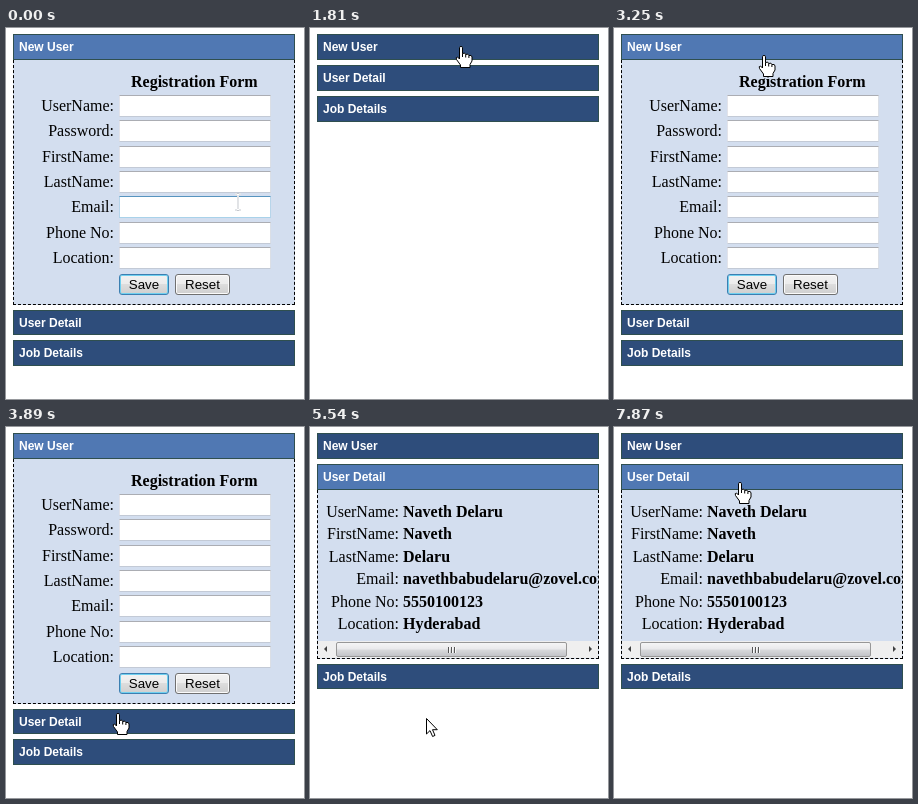
An HTML page for the animation above (8000 ms loop, 298 px wide and 371 px high).

```html
<!DOCTYPE html>
<html lang="en">
<head>
<meta charset="utf-8">
<title>Accordion form</title>
<style>
html, body { margin: 0; width: 100%; height: 100%; overflow: hidden; background: #fff; }
* { box-sizing: border-box; }
#accordion { position: absolute; left: 7px; top: 6.2px; width: 282px; }
.header {
  height: 25.8px; padding: 5px; border: 1px solid #2f4f4f; background: #2e4d7b; color: #fff;
  font: bold 12px/14px "Liberation Sans", Arial, sans-serif;
}
.header.selected { background: #5078b3; }
.pane + .pane { margin-top: 5px; }
.clip { overflow: hidden; }
.content {
  position: relative; overflow: hidden; background: #d3deef; color: #000;
  border: 1px dashed #000; border-top: 0;
  font: 16px/18px "Liberation Serif", "Times New Roman", serif;
}
.content > * { position: absolute; white-space: nowrap; }
.field {
  left: 105px; width: 152px; height: 22px; background: #fff;
  border: 1px solid; border-color: #abadb3 #dbdfe6 #c3cad6 #e2e3ea;
}
.field.hover { border-color: #5794bf #b7d5ea #a9d2ea #b7d5ea; }
.button {
  top: 214px; height: 21px; border: 1px solid #707070; border-radius: 3px;
  background: linear-gradient(#f2f2f2, #ebebeb 50%, #dddddd 50%, #cfcfcf);
  box-shadow: inset 0 0 0 1px #fbfbfb; text-align: center;
  font: 13.33px/19px "Liberation Sans", Arial, sans-serif;
}
.button.default { border-color: #3c7fb1; box-shadow: inset 0 0 0 1px #6fd0f0; }
.scrollbar { left: 0; top: 151px; width: 280px; height: 17px; background: #efefef; }
.scrollbar * { position: absolute; }
.thumb {
  left: 18px; top: 1px; width: 231px; height: 15px; border: 1px solid #979797; border-radius: 2px;
  background: linear-gradient(#f5f5f5, #e9e9eb 48%, #d9dadc 52%, #c3c4c8);
}
.grip {
  left: 111px; top: 4px; width: 8px; height: 6px;
  background: repeating-linear-gradient(90deg, #555 0 1px, #fafafa 1px 2px, transparent 2px 3px);
}
.arrow { top: 5px; border: 3.5px solid transparent; }
.arrow.left { left: 6px; border-right-color: #404040; border-left: 0; }
.arrow.right { right: 6px; border-left-color: #404040; border-right: 0; }
svg { position: absolute; left: 0; top: 0; overflow: visible; }
</style>
</head>
<body>
<div id="accordion"></div>
<svg id="cursor" width="24" height="24">
  <g id="hand" fill="#fff" stroke="#000" stroke-linejoin="round">
    <path d="M-1.5 13V1.5Q-1.5.5 0 .5T1.5 1.5V7.5Q4.5 6.3 4.7 8.5Q7.5 7.3 7.9 9.5Q11 8.8 11 11V15L9 18.5V21.5H-.5V19L-4.5 13.5Q-5.5 11-3.5 11Z"/>
    <path d="M1.5 7.5V11M4.7 8.5V11.5M7.9 9.5V12" fill="none"/>
  </g>
  <path id="pointer" d="M.5.5V16L4 12.6L6.6 18.5L9 17.4L6.5 11.7H11.3Z" fill="#fff" stroke="#000"/>
  <g id="beam" fill="none">
    <path d="M-3-8H-1L0-7L1-8H3M0-7V7M-3 8H-1L0 7L1 8H3" stroke="#c4c8ce" stroke-width="2"/>
    <path d="M-3-8H-1L0-7L1-8H3M0-7V7M-3 8H-1L0 7L1 8H3" stroke="#fff"/>
  </g>
</svg>
<script>
const LOOP = 8000;
const FORM_HEIGHT = 244.6, DETAIL_HEIGHT = 168.8;
const byId = id => document.getElementById(id);
const root = byId("accordion"), pointerLayer = byId("cursor");
const shapes = ["hand", "pointer", "beam"].map(byId);

function add(parent, className, text = "", style = {}) {
  const node = document.createElement("div");
  node.className = className;
  node.textContent = text;
  Object.assign(node.style, style);
  return parent.appendChild(node);
}

function addPane(title, height) {
  const pane = add(root, "pane");
  const header = add(pane, "header", title);
  const clip = add(pane, "clip");
  const content = add(clip, "content", "", { height: height + "px" });
  return { header, clip, content, height };
}

const form = addPane("New User", FORM_HEIGHT);
const detail = addPane("User Detail", DETAIL_HEIGHT);
addPane("Job Details", 0).clip.style.display = "none";

const addLabel = (pane, text, right, top) =>
  add(pane.content, "label", text + ":", { right: 280 - right + "px", top: top + "px" });

add(form.content, "title", "Registration Form", { left: "117px", top: "13px", fontWeight: "bold" });
const fields = ["UserName", "Password", "FirstName", "LastName", "Email", "Phone No", "Location"].map((name, i) => {
  const top = Math.round(35 + i * 25.35);
  addLabel(form, name, 100, top + 2);
  return { top: top + 32, node: add(form.content, "field", "", { top: top + "px" }) };
});
add(form.content, "button default", "Save", { left: "105px", width: "50px" });
add(form.content, "button", "Reset", { left: "161px", width: "55px" });

[
  ["UserName", "Naveth Delaru"], ["FirstName", "Naveth"], ["LastName", "Delaru"],
  ["Email", "navethbabudelaru@zovel.com"], ["Phone No", "5550100123"], ["Location", "Hyderabad"]
].forEach(([name, value], i) => {
  const top = Math.round(13 + i * 22.4);
  addLabel(detail, name, 81, top);
  add(detail.content, "value", value, { left: "85px", top: top + "px", fontWeight: "bold" });
});
const bar = add(detail.content, "scrollbar");
add(bar, "arrow left");
add(add(bar, "thumb"), "grip");
add(bar, "arrow right");

// time, selected pane, openness of the form, openness of the details
const paneSteps = [
  [0, form, 1, 0],
  [1520, null, 1, 0], [1670, null, 0.35, 0], [1810, null, 0, 0],
  [2380, form, 0.1, 0], [2530, form, 0.703, 0], [2680, form, 1, 0],
  [5190, detail, 1, 0], [5370, detail, 0.35, 0.65], [5540, detail, 0, 1]
];

// time, cursor shape, hot spot
const cursorSteps = [
  [0, "beam", 232, 174], [110, "beam", 229, 160], [280, "beam", 214, 127], [450, "beam", 191, 82],
  [620, "pointer", 168, 46], [790, "hand", 154, 21], [1210, "hand", 151, 18],
  [3250, "hand", 150, 27], [3400, "beam", 143, 80], [3550, "beam", 132, 160],
  [3720, "pointer", 119, 243], [3890, "hand", 112, 286], [4040, "hand", 115, 289],
  [4190, "hand", 118, 291], [4430, "hand", 119, 292],
  [5540, "pointer", 116, 291],
  [6510, "pointer", 117, 283], [6665, "hand", 118, 252], [6820, "pointer", 120, 217],
  [6975, "beam", 121, 172], [7130, "beam", 123, 125], [7285, "beam", 124, 84],
  [7440, "hand", 126, 59], [7590, "hand", 126, 56], [7870, "hand", 126, 55]
];

const stepAt = (steps, time) => steps.findLast(step => step[0] <= time);

function setPane(pane, selected, open) {
  pane.header.classList.toggle("selected", pane === selected);
  pane.clip.style.height = pane.height * open + "px";
  pane.content.style.opacity = open;
}

function draw(now) {
  const time = now % LOOP;
  const [, selected, formOpen, detailOpen] = stepAt(paneSteps, time);
  const [, shape, x, y] = stepAt(cursorSteps, time);
  setPane(form, selected, formOpen);
  setPane(detail, selected, detailOpen);
  for (const { top, node } of fields)
    node.classList.toggle("hover", shape === "beam" && y >= top && y < top + 22);
  for (const node of shapes) node.style.display = node.id === shape ? "" : "none";
  pointerLayer.style.transform = `translate(${x}px, ${y}px)`;
}

const start = performance.now();
function tick() {
  draw(performance.now() - start);
  requestAnimationFrame(tick);
}
tick();
</script>
</body>
</html>
```
